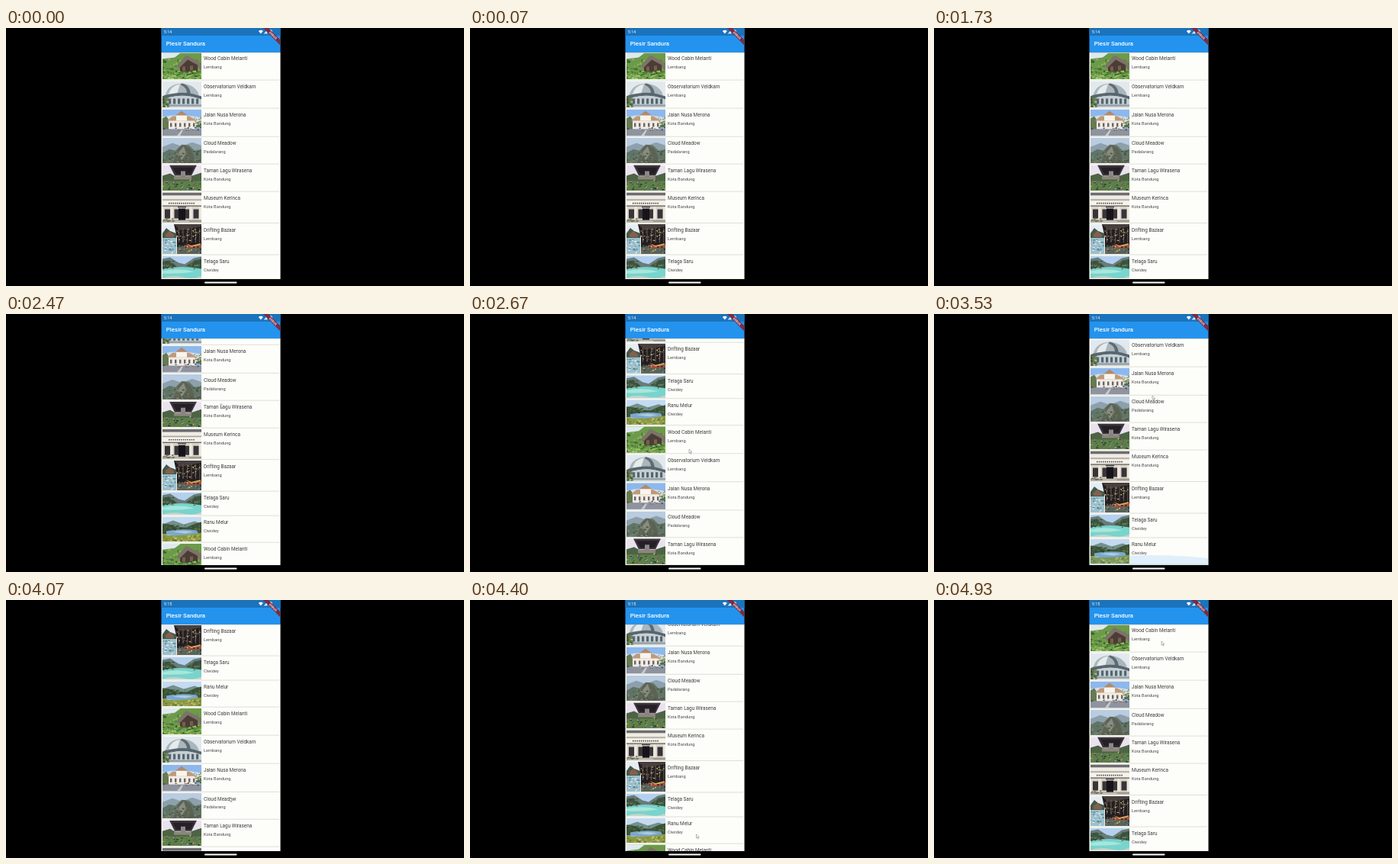
Animation, 600 px wide and 338 px high, one loop 4990 ms. Source, as an HTML page:

```html
<!DOCTYPE html>
<html lang="id">
<head>
<meta charset="utf-8">
<title>Plesir Sandura</title>
<style>
html, body { margin: 0; height: 100%; overflow: hidden; background: #000; }
svg { display: block; }
#stage { width: 100vw; height: 100vh; }
text { font-family: Roboto, Arial, sans-serif; }
.name { font-size: 6.4px; fill: #3c3c3e; }
.city { font-size: 5.7px; fill: #4c4c50; }
.bar { font-size: 7.9px; font-weight: 500; fill: #fff; }
.status { font-size: 5.5px; fill: #eef5ff; }
.debug { font-size: 4px; font-weight: 900; fill: #e8d4dc; text-anchor: middle; }
</style>
</head>
<body>
<svg id="stage" viewBox="0 0 600 338">
  <defs>
    <clipPath id="view"><rect x="203.5" y="32" width="156" height="297"/></clipPath>
    <clipPath id="phone"><rect x="203.5" width="156" height="338"/></clipPath>
    <linearGradient id="shade" x2="0" y2="1">
      <stop stop-color="#707068" stop-opacity=".5"/><stop offset="1" stop-color="#fff" stop-opacity="0"/>
    </linearGradient>
  </defs>
  <rect width="600" height="338"/>
  <rect x="203.5" y="32" width="156" height="297" fill="#fdfdf9"/>
  <g clip-path="url(#view)">
    <g id="list"></g>
    <ellipse id="glow" cx="281.5" cy="329" rx="105" fill="#2196f3" opacity=".13"/>
  </g>
  <rect x="203.5" y="32" width="156" height="1.6" fill="url(#shade)"/>
  <rect x="203.5" width="156" height="32" fill="#2393ee"/>
  <rect x="203.5" width="156" height="10" fill="#1b73bb"/>
  <text class="status" id="clock" x="206.8" y="6.9"></text>
  <text class="bar" x="209.8" y="23.3">Plesir Sandura</text>
  <g fill="#f4f8ff">
    <path d="M330.8 3.9Q333.8 1.6 336.8 3.9L333.8 7.6Z"/>
    <path d="M342.4 2.4V7.4H337.6Z" opacity=".85"/>
    <path d="M345 3H346V2.3H347.6V3H348.6V7.6H345Z"/>
  </g>
  <g clip-path="url(#phone)">
    <g transform="translate(359.5 0) rotate(45)">
      <rect x="-17" y="11.2" width="34" height="4.8" fill="#7c2b42"/>
      <text class="debug" y="15.1">DEBUG</text>
    </g>
  </g>
  <rect x="260" y="332.6" width="42.5" height="1.9" rx=".95" fill="#fff"/>
  <path id="cursor" d="M0 0V5L1.2 4L2 6L3 5.6L2.2 3.8H3.8Z" fill="#fff" stroke="#6d6d70" stroke-width=".5"/>
</svg>
<script>
const $ = id => document.getElementById(id);

let seed = 7;
const rnd = () => (seed = seed * 16807 % 2147483647) / 2147483647;

// shapes: colour and path by turns
const draw = (...parts) => {
  let out = '';
  for (let i = 0; i < parts.length; i += 2) out += `<path fill="${parts[i]}" d="${parts[i + 1]}"/>`;
  return out;
};
const box = (x, y, w, h) => `M${x} ${y}h${w}v${h}h${-w}z`;
const full = box(0, 0, 51, 40);
// scattered small blots inside a box
const dabs = (n, colors, x, y, w, h, r = 1) => Array.from({ length: n }, () =>
  `<ellipse cx="${(x + rnd() * w).toFixed(1)}" cy="${(y + rnd() * h).toFixed(1)}" rx="${(r * (.6 + rnd())).toFixed(1)}" ry="${(r * (.4 + rnd() * .6)).toFixed(1)}" fill="${colors[rnd() * colors.length | 0]}"/>`).join('');
const row = (n, step, f) => Array.from({ length: n }, (_, i) => f(i * step)).join('');

const barn = draw('#6d9a4a', full, '#dfe9ee', 'M0 0H24L16 6L0 8Z') +
  dabs(50, ['#3a6230', '#6d9a45', '#8cb35a', '#4d7a3a'], 0, 7, 51, 20, 1.6) +
  draw('#7c7468', 'M18 18L31 3L51 13V22L36 15L24 21Z', '#4c3c36', 'M23 19L33 9L46 16V25H23Z',
    '#76604e', box(26, 18, 4, 6) + box(36, 17, 4, 6)) +
  dabs(90, ['#7fb050', '#4a7832', '#a4cc70', '#365a28', '#8fbe58'], 0, 23, 51, 12, 1.4);

const dome = draw('#e2e9ee', full, '#56684e', 'M0 20L8 16V37H0Z', '#aab6bc', 'M4 18Q7 4 26 3Q43 5 48 18Z',
    '#e6ebec', 'M8 17Q11 6 23 4L19 17Z', '#5d6b74', 'M25 3Q36 5 37 18H32Q33 9 24 5Z',
    '#586670', 'M4 19Q27 11 51 20V24Q27 15 4 23Z', '#c6d0d4', 'M4 23Q27 15 51 24V37H4Z',
    '#566670', row(7, 6, x => box(8 + x, 23, 3.2, 7)), '#8d9ba0', box(6, 31, 45, 2)) +
  dabs(22, ['#3a5230', '#6b8250'], 0, 23, 9, 12, 1.5);

const street = draw('#8db8ec', full, '#cfe0f0', 'M0 10Q22 5 51 11V20H0Z', '#667a52', 'M0 12L5 9L9 15V27H0Z',
    '#f0ece6', 'M8 14H44V26H8Z', '#c09a76', 'M6 15L13 9H35L46 15Z', '#f8f4ee', 'M18 15V8L25 5L32 8V15Z',
    '#b18a6c', 'M17 8L25 2L33 8Z', '#6c6464', row(6, 6, x => box(10 + x, 18, 2.4, 5)),
    '#8f939e', 'M0 26H51V37H0Z', '#c8cad2', 'M17 37L25 27H27L22 37Z') +
  dabs(18, ['#c4a450', '#7b8848', '#586a40'], 42, 10, 9, 15, 1.5) +
  dabs(16, ['#4c5050', '#9a7458'], 0, 24, 51, 4);

const rocks = draw('#b9cce0', full, '#8ea0ac', 'M0 12L13 7L25 11L39 6L51 10V36H0Z',
    '#617468', 'M0 20L9 15L17 17L25 9L35 10L42 17L51 15V36H0Z',
    '#5d6254', 'M13 36L21 14L28 9L37 15L45 36Z', '#888c84', 'M21 19L28 11L31 21L25 30Z') +
  dabs(70, ['#42583c', '#728454', '#868878', '#505248', '#5c7468'], 0, 18, 51, 17, 1.3);

const park = draw('#e9e2ee', full, '#3c353c', 'M9 0H45L38 14H16Z', '#242026', 'M13 3H41L37 12H18Z',
    '#8f8688', box(24, 8, 6, 12), '#4c6444', 'M0 14L10 11L17 15H36L51 10V23H0Z', '#8c867c', box(15, 15, 23, 4),
    '#5e8248', 'M0 21H51V36H0Z') +
  dabs(80, ['#2c3028', '#8c5c5c', '#c8c4b8', '#4a6e34', '#505a80'], 1, 20, 49, 14, 1);

const museum = draw('#d8d4c8', full, '#6c6c70', box(0, 0, 51, 4), '#f0ece4', box(0, 4, 51, 5),
    '#98948c', box(0, 9, 51, 1), '#f6f3ec', box(0, 11, 51, 6), '#48464a', row(13, 2.7, x => box(8 + x, 13.2, 1.5, 1.6)),
    '#66625c', box(0, 17, 51, 1.2), '#38343a', row(4, 12.5, x => box(3 + x, 22, 7, 12)),
    '#eee8dc', row(5, 12.5, x => box(-2 + x, 19, 3.2, 17)), '#161418', box(21, 21, 9, 17),
    '#a09a90', 'M0 36H51V41H0Z', '#3c3838', box(20, 18.5, 11, 1.2), '#c8c4b8', 'M17 37H34L38 41H13Z') +
  dabs(12, ['#4a5a3c', '#74785c'], 0, 34, 17, 4);

const market = draw('#e6edf2', full, '#46584a', 'M0 12L5 5L10 9L18 12V20H0Z', '#84604e', 'M4 13L9 9L15 14V17H4Z',
    '#9cc0cc', 'M0 18H18V41H0Z', '#221e22', 'M15 0H51V41H19V18Z', '#48403e', 'M15 0H51V3L24 8Z',
    '#6c5c4c', row(6, 5.5, x => box(21 + x, 5, 1, 19))) +
  dabs(40, ['#e0c078', '#a87c4c', '#f0e8c0', '#6c7c58'], 19, 6, 32, 16, .8) +
  draw('#55645c', 'M19 30L51 27V41H19Z', '#b0483c', 'M29 27Q39 31 51 27V30Q39 34 29 30Z',
    '#d8a850', 'M30 25L38 28L50 25V27L38 30Z') +
  dabs(26, ['#2c2a2c', '#84907c', '#b06a44', '#c8b878'], 19, 28, 32, 10) +
  dabs(36, ['#edf5f8', '#5c8490', '#78a8b4'], 0, 20, 17, 18, 1.1);

const crater = draw('#b4d0ee', full, '#687c78', 'M0 4L10 2L21 9L29 11L41 3L51 1V18H0Z',
    '#3c5440', 'M0 7L9 6L19 14L0 19ZM31 13L43 6L51 4V19Z', '#78d4cc', 'M0 17Q25 12 51 17V32H0Z',
    '#a8e6dc', 'M0 20Q21 15 42 21Q20 24 0 23Z', '#c8d4c8', 'M0 29Q13 25 27 28T51 26V33H0Z') +
  dabs(30, ['#4a6444', '#74866c', '#304834'], 0, 7, 15, 10) + dabs(26, ['#4a6444', '#74866c', '#304834'], 36, 6, 15, 11);

const lake = draw('#c4daf0', full, '#74908c', 'M0 10L14 5L28 10L42 6L51 9V20H0Z',
    '#3c5438', 'M0 9L9 10L18 14H32L43 9L51 7V23H0Z', '#7ca8cc', 'M5 19Q24 15 45 18L48 24Q22 27 5 23Z',
    '#b0cce0', 'M13 20Q28 17 40 20L30 22Z', '#8c9a44', 'M0 23Q18 27 51 21V36H0Z') +
  dabs(55, ['#b0b258', '#5c7034', '#808e40', '#c0c070'], 0, 25, 51, 9, 1.3) +
  dabs(34, ['#2c4428', '#587044'], 0, 11, 51, 6, 1.3);

const places = [
  ['Wood Cabin Melanti', 'Lembang', 37, barn],
  ['Observatorium Veldkam', 'Lembang', 37, dome],
  ['Jalan Nusa Merona', 'Kota Bandung', 37.2, street],
  ['Cloud Meadow', 'Padalarang', 35.8, rocks],
  ['Taman Lagu Wirasena', 'Kota Bandung', 36, park],
  ['Museum Kerinca', 'Kota Bandung', 41.4, museum],
  ['Drifting Bazaar', 'Lembang', 41.5, market],
  ['Telaga Saru', 'Ciwidey', 32, crater],
  ['Ranu Melur', 'Ciwidey', 35.1, lake],
];

let y = 32.6;
$('list').innerHTML = [...places, ...places].map(([name, city, h, photo]) => {
  const html = `<g transform="translate(205 ${y.toFixed(1)})">
    <svg width="51" height="${(h - 2.6).toFixed(1)}">${photo}</svg>
    <rect x="-1" y="${(h - 2).toFixed(1)}" width="154" height="1" fill="#e0e0d8"/>
    <text class="name" x="54" y="9.7">${name}</text>
    <text class="city" x="54" y="20.6">${city}</text></g>`;
  y += h;
  return html;
}).join('');

// keys: [time, value, ...], straight between them
const at = (keys, t, n = 1) => {
  const i = keys.findIndex(k => k[0] > t);
  if (i === 0) return keys[0][n];
  if (i < 0) return keys[keys.length - 1][n];
  const a = keys[i - 1], b = keys[i];
  return a[n] + (b[n] - a[n]) * (t - a[0]) / (b[0] - a[0]);
};

// flick up to the end, pull against it, then drag and fling back to the top
const scroll = [[2270, 0], [2467, 65], [2600, 170], [2800, 315], [2933, 369],
  [3720, 369], [4067, 223.8], [4200, 140], [4400, 45], [4600, 0]];
const pointer = [[1800, 247, 285], [1933, 283, 234], [2200, 283, 187], [2270, 283, 187], [2533, 281, 94],
  [2800, 293, 260], [2933, 293, 203], [3200, 286, 107], [3690, 286, 107], [4067, 293, 259],
  [4200, 296, 300], [4667, 297, 316], [4933, 298, 54]];
const glow = [[2933, 0], [3200, 13], [3600, 13], [3800, 0]];
const LOOP = 4990, STEP = 200 / 3;

const start = performance.now();
function frame() {
  const now = (performance.now() - start) % LOOP;
  const t = Math.floor((now + 4) / STEP) * STEP; // 15 steps a second
  $('list').setAttribute('transform', `translate(0 ${-at(scroll, t)})`);
  $('glow').setAttribute('ry', at(glow, t));
  $('cursor').setAttribute('transform', `translate(${at(pointer, t)} ${at(pointer, t, 2)})`);
  $('cursor').style.display = t < 1799 ? 'none' : '';
  $('clock').textContent = t < 3800 ? '5:14' : '5:15';
  requestAnimationFrame(frame);
}
frame();
</script>
</body>
</html>
```
